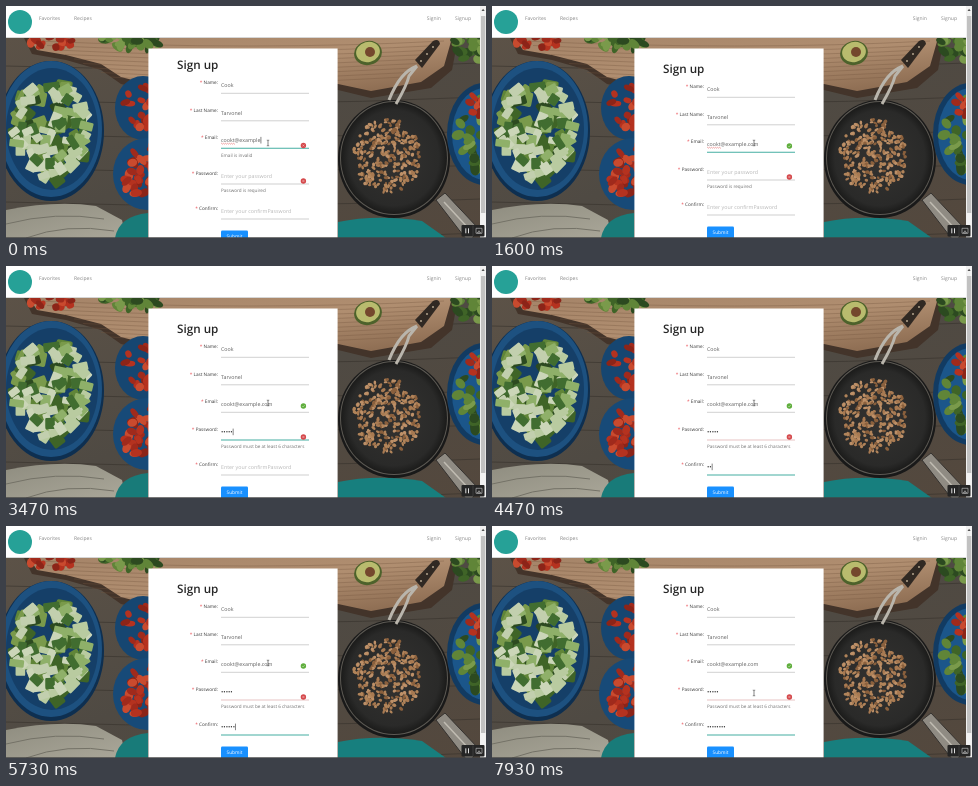
Write an HTML page that moves like this. It is 480 px wide and 232 px high and loops after 8000 ms.

```html
<!DOCTYPE html>
<html lang="en">
<head>
<meta charset="utf-8">
<title>Sign up</title>
<style>
  html, body { margin: 0; height: 100%; overflow: hidden; background: #fff; }
  svg { display: block; width: 100%; height: 100%; }
  text { font-family: "Open Sans", "Noto Sans", sans-serif; text-rendering: geometricPrecision; white-space: pre; }
  .nav { font-size: 5px; fill: #858585; }
  .label { font-size: 4.7px; fill: #383838; text-anchor: end; }
  .label tspan { fill: #e8434a; }
  .value { font-size: 5.3px; fill: #606060; }
  .value.empty { fill: #b8b8b8; }
  .value.dots { font-size: 6.2px; fill: #333; }
  .error { font-size: 4.6px; fill: #707070; }
</style>
</head>
<body>
<svg viewBox="0 0 480 232" preserveAspectRatio="none">
  <defs>
    <linearGradient id="table" x2="1" y2="1">
      <stop offset="0" stop-color="#5c5247"/><stop offset=".5" stop-color="#4f4a43"/><stop offset="1" stop-color="#54483d"/>
    </linearGradient>
    <linearGradient id="board" y2="1">
      <stop offset="0" stop-color="#a58468"/><stop offset=".5" stop-color="#b08e70"/><stop offset="1" stop-color="#86664c"/>
    </linearGradient>
    <linearGradient id="napkin" y2="1">
      <stop offset="0" stop-color="#8f8d80"/><stop offset="1" stop-color="#aaa799"/>
    </linearGradient>
    <radialGradient id="pan">
      <stop offset="0" stop-color="#333230"/><stop offset=".85" stop-color="#2a2a29"/><stop offset="1" stop-color="#1b1b1a"/>
    </radialGradient>
    <clipPath id="photoClip"><path d="M0 32H474V232H0Z"/></clipPath>
  </defs>

  <g clip-path="url(#photoClip)">
    <path d="M0 32H474V232H0Z" fill="url(#table)"/>
    <g id="planks" stroke="#37322c" stroke-width="1" opacity=".6"/>
    <path d="M18 32L26 48 60 54 95 64 115 78 142 84H332L365 92 425 82 446 64 452 32Z" fill="#43342a"/>
    <path d="M23 32L31 44 60 49 95 58 115 71 142 78H332L365 85 415 76 438 60 446 32Z" fill="url(#board)"/>
    <g id="grain" stroke="#75573f" stroke-width=".7" opacity=".5"/>
    <g id="garnish"/>

    <path d="M0 204Q50 194 90 200L116 214 120 232H0Z" fill="url(#napkin)"/>
    <path d="M0 218Q50 205 98 213M20 232Q60 217 108 225" fill="none" stroke="#747267" stroke-width="1"/>
    <path d="M109 232Q113 210 142 207V232Z" fill="#187b79"/>
    <path d="M332 216Q370 208 416 215L440 232H332Z" fill="#177f7e"/>

    <ellipse cx="45" cy="125" rx="53" ry="70" fill="#0e2f50"/>
    <ellipse cx="45" cy="123" rx="51" ry="68" fill="#1d5180"/>
    <ellipse cx="46" cy="123" rx="46" ry="61" fill="#153f68"/>
    <g id="greens"/>

    <ellipse cx="137" cy="102" rx="28" ry="32" fill="#164671"/>
    <ellipse cx="141" cy="168" rx="34" ry="36" fill="#174a78"/>
    <g id="tomatoes"/>

    <path d="M430 194L439 187 472 222 466 233H460Z" fill="#8f8b83" stroke="#35322f"/>
    <path d="M438 196L465 225" stroke="#c0bcb2" stroke-width="1.5"/>
    <ellipse cx="388" cy="153" rx="56" ry="59" fill="#191919"/>
    <ellipse cx="388" cy="152" rx="54" ry="57" fill="#5d5a54"/>
    <ellipse cx="388" cy="152" rx="53" ry="56" fill="url(#pan)"/>
    <g id="chickpeas"/>

    <ellipse cx="362" cy="47" rx="14" ry="12" fill="#4d622b" transform="rotate(-15 362 47)"/>
    <ellipse cx="362" cy="46" rx="12" ry="10" fill="#b9bb6e" transform="rotate(-15 362 46)"/>
    <circle cx="364" cy="46" r="5" fill="#74482d"/>

    <path d="M411 60L403 70Q401 79 390 98M411 60Q394 66 383 94" fill="none" stroke="#b9b5ac" stroke-width="3"/>
    <path d="M409 54L427 35Q433 32 434 38L416 62Z" fill="#302923"/>
    <g fill="#b3a58e"><circle cx="415" cy="55" r="1"/><circle cx="421" cy="48" r="1"/><circle cx="427" cy="41" r="1"/></g>

    <ellipse cx="478" cy="128" rx="37" ry="51" fill="#123b62"/>
    <ellipse cx="479" cy="128" rx="33" ry="46" fill="#1b568a"/>
    <g id="sideSalad"/>
  </g>

  <path d="M0 0H474V31.5H0Z" fill="#fff"/>
  <path d="M0 31.5H474" stroke="#bbb" stroke-width=".6"/>
  <circle cx="14" cy="16" r="12" fill="#26a197"/>
  <g class="nav">
    <text x="33" y="14">Favorites</text><text x="68" y="14">Recipes</text>
    <text x="420.7" y="14">Signin</text><text x="449" y="14">Signup</text>
  </g>

  <path d="M142.4 42.4H331.6V232H142.4Z" fill="#fff"/>
  <g id="upper">
    <text x="171" y="67.3" font-size="11.7" font-weight="600" fill="#262626">Sign up</text>
  </g>
  <g id="lower">
    <rect x="215" y="220.5" width="27" height="13" rx="1.2" fill="#1890ff"/>
    <text x="228.5" y="228" font-size="4.8" fill="#fff" text-anchor="middle">Submit</text>
  </g>
  <path id="caret" d="M0 -5.2V1.4" stroke="#333" stroke-width=".6"/>
  <path id="pointer" d="M-1.2 -2.8H-.3L0 -2.4 .3 -2.8H1.2M0 -2.4V2.4M-1.2 2.8H-.3L0 2.4 .3 2.8H1.2" fill="none" stroke="#333" stroke-width=".6"/>

  <path d="M474 0H480V232H474Z" fill="#f1f1f1"/>
  <path d="M475 10H479.3V207H475Z" fill="#c1c1c1"/>
  <path d="M475.5 5L477.1 2.8 478.7 5Z" fill="#555"/>
  <path d="M0 231.6H480" stroke="#444" stroke-width=".8"/>
  <rect x="455.5" y="219" width="23" height="11.5" rx="1" fill="#252525"/>
  <path d="M467 219.5V230" stroke="#555" stroke-width=".5"/>
  <path d="M459.8 222.3V227.3M462.5 222.3V227.3" stroke="#ddd" stroke-width="1"/>
  <path d="M470 222.3H476V227.3H470ZM471.4 227L473 224.7 474.6 227Z" fill="none" stroke="#ccc" stroke-width=".6"/>
</svg>

<script>
const LOOP = 8000, BLINK = 530;
const TEAL = '#45aea2', GREY = '#b0b0b0', RED = '#d79a9a';
const EMAIL = 'cookt@example.com';
const KEYS = {
  email: [200, 350, 500, 650],
  password: [2250, 2750, 2950, 3150, 3350],
  confirm: [4150, 4380, 4850, 5150, 5400, 5600, 5950, 6150]
};
const FOCUS = { email: 0, password: 1750, confirm: 3800 };
const VALID_AT = 500;

const $ = id => document.getElementById(id);
const clamp = v => Math.max(0, Math.min(1, v));
const ease = v => { v = clamp(v); return v * v * (3 - 2 * v); };

function add(parent, tag, attrs, content = '') {
  const el = document.createElementNS('http://www.w3.org/2000/svg', tag);
  for (const k in attrs) el.setAttribute(k, attrs[k]);
  el.textContent = content;
  parent.append(el);
  return el;
}

let seed = 17;
const random = () => (seed = seed * 16807 % 2147483647) / 2147483647;

// Fills an ellipse with randomly turned pieces; a small corner makes them blocky.
function scatter(id, count, cx, cy, rx, ry, size, colors, corner = size) {
  for (let i = 0; i < count; i++) {
    const angle = random() * 6.283, r = Math.sqrt(random());
    const x = cx + rx * r * Math.cos(angle), y = cy + ry * r * Math.sin(angle);
    const w = size * (1.5 + random()), h = size * (1 + random() * .7);
    add($(id), 'rect', {
      x: -w / 2, y: -h / 2, width: w, height: h, rx: corner,
      fill: colors[i % colors.length],
      transform: `translate(${x} ${y}) rotate(${random() * 180})`
    });
  }
}

function paintPhoto() {
  for (let y = 60; y < 232; y += 34)
    add($('planks'), 'path', { d: `M0 ${y}Q240 ${y + 8} 474 ${y - 3}`, fill: 'none' });
  for (let i = 0; i < 9; i++) {
    const y = 35 + i * 4.5;
    add($('grain'), 'path', { d: `M${32 + i * 9} ${y}Q250 ${y + 10} ${438 - i * 5} ${y}`, fill: 'none' });
  }
  const red = ['#b5321f', '#8c2418', '#c94a2e', '#a02a1c'];
  const leaf = ['#3f6427', '#608538', '#2c4a20', '#7a9a4b'];
  scatter('garnish', 14, 48, 36, 24, 6, 5, red);
  scatter('garnish', 40, 122, 34, 32, 9, 6, leaf);
  scatter('garnish', 28, 464, 40, 20, 16, 6, leaf);
  scatter('greens', 45, 44, 125, 36, 51, 8, leaf, 2);
  scatter('greens', 70, 44, 123, 37, 50, 6.5, ['#b9cba0', '#cbd6b8', '#8fb069', '#c2cfae', '#416d30'], 1.2);
  scatter('tomatoes', 26, 140, 100, 21, 24, 5, red);
  scatter('tomatoes', 44, 141, 165, 25, 28, 5, red);
  scatter('chickpeas', 270, 381, 150, 34, 37, 2.1, ['#a87a52', '#bd9068', '#8a603d', '#b1845a']);
  scatter('sideSalad', 40, 478, 128, 27, 39, 6, leaf);
  scatter('sideSalad', 9, 474, 98, 12, 11, 5, red);
}

function addField(group, label, y, value = '', hint = '') {
  const g = $(group);
  const name = add(g, 'text', { class: 'label', x: 212, y: y - 9 });
  add(name, 'tspan', {}, '* ');
  name.append(label + ':');
  return {
    y, hint,
    text: add(g, 'text', { class: 'value', x: 215, y: y - 6.2 }, value),
    line: add(g, 'path', { d: `M215 ${y}H303`, stroke: GREY, 'stroke-width': .6 }),
    error: add(g, 'text', { class: 'error', x: 215, y: y + 8.3 })
  };
}

function addStatus(group) {
  const g = add($(group), 'g', {});
  return {
    g,
    disc: add(g, 'circle', { r: 2.7 }),
    mark: add(g, 'path', { fill: 'none', stroke: '#fff', 'stroke-width': .5, opacity: .7 })
  };
}

function setStatus(status, valid, y) {
  status.g.setAttribute('transform', `translate(297.4 ${y})`);
  status.disc.setAttribute('fill', valid ? '#5fae3c' : '#d5494c');
  status.mark.setAttribute('d', valid ? 'M-1.3 0L-.3 1 1.4 -1' : 'M-1 -1L1 1M1 -1L-1 1');
}

paintPhoto();
addField('upper', 'Name', 91.3, 'Cook');
addField('upper', 'Last Name', 118.8, 'Tarvonel');
const fields = {
  email: addField('upper', 'Email', 146.3),
  password: addField('lower', 'Password', 174, '', 'Enter your password'),
  confirm: addField('lower', 'Confirm', 209, '', 'Enter your confirmPassword')
};
const emailStatus = addStatus('upper'), passwordStatus = addStatus('lower');
const squiggle = add($('upper'), 'path', {
  d: 'M215 141.7' + 'q.5 -.8 1 0t1 0'.repeat(7), fill: 'none', stroke: '#df4a4a', 'stroke-width': .5
});

function setText(field, value) {
  field.text.textContent = value || field.hint;
  field.text.classList.toggle('empty', !value);
  field.text.classList.toggle('dots', value.startsWith('•'));
}

function render(t) {
  const typed = name => KEYS[name].filter(k => k <= t).length;
  const active = t < FOCUS.password ? 'email' : t < FOCUS.confirm ? 'password' : 'confirm';
  const { email, password, confirm } = fields;
  const valid = t >= VALID_AT;
  const shift = 4 * (1 - ease((t - VALID_AT) / 200));

  $('upper').setAttribute('transform', `translate(0 ${-shift})`);
  $('lower').setAttribute('transform', `translate(0 ${shift})`);

  setText(email, EMAIL.slice(0, 13 + typed('email')));
  setText(password, '•'.repeat(typed('password')));
  setText(confirm, '•'.repeat(typed('confirm')));
  email.error.textContent = valid ? '' : 'Email is invalid';
  password.error.textContent = typed('password') ? 'Password must be at least 6 characters' : 'Password is required';

  for (const name in fields) {
    const focused = name === active;
    const color = focused ? TEAL : name === 'password' && t >= FOCUS.confirm ? RED : GREY;
    fields[name].line.setAttribute('stroke', color);
    fields[name].line.setAttribute('stroke-width', focused ? 1.1 : .6);
  }
  setStatus(emailStatus, valid, valid ? 140 : 143.5);
  setStatus(passwordStatus, false, 171);
  squiggle.style.display = active === 'email' ? '' : 'none';

  const field = fields[active], count = typed(active);
  const lastEvent = count ? KEYS[active][count - 1] : FOCUS[active];
  const width = field.text.classList.contains('empty') ? 0 : field.text.getComputedTextLength();
  const dy = active === 'email' ? -shift : shift;
  $('caret').setAttribute('transform', `translate(${215.5 + width} ${field.y - 6.2 + dy})`);
  $('caret').style.display = Math.floor((t - lastEvent) / BLINK) % 2 ? 'none' : '';

  $('pointer').setAttribute('transform', `translate(262 ${137 + 30 * ease((t - 7450) / 430)})`);
}

function tick() {
  render(performance.now() % LOOP);
  requestAnimationFrame(tick);
}
tick();
</script>
</body>
</html>
```
